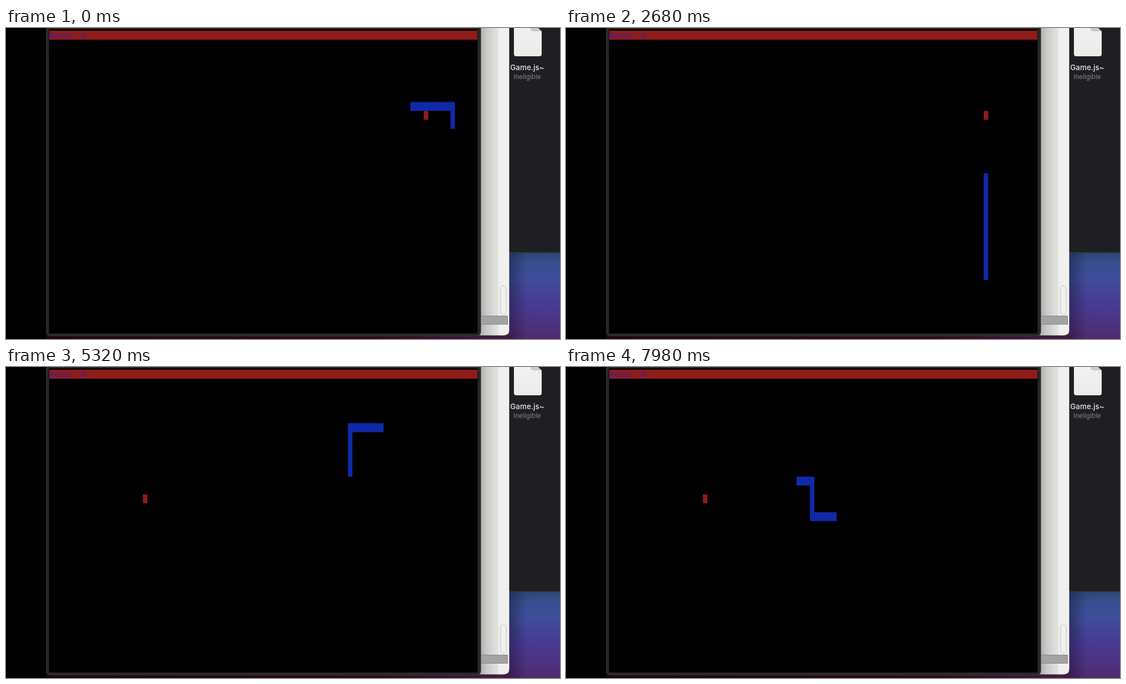
An HTML page for the animation above (8000 ms loop, 998 by 561 pixels).

```html
<!DOCTYPE html>
<html lang="en">
<head>
<meta charset="utf-8">
<title>Terminal snake</title>
<style>
  html, body { margin: 0; width: 100%; height: 100%; overflow: hidden; background: #000; }
  svg { display: block; width: 100%; height: 100%; }
  .label { font-family: Inter, sans-serif; text-anchor: middle; }
  #score { font: bold 13.35px "Liberation Mono", monospace; fill: #40209c; white-space: pre; }
</style>
</head>
<body>
<svg viewBox="0 0 998 561">
  <defs>
    <linearGradient id="wallpaper" x2="0" y2="1">
      <stop stop-color="#2c4773"/>
      <stop offset=".12" stop-color="#374f8f"/>
      <stop offset=".3" stop-color="#3f4d9c"/>
      <stop offset=".6" stop-color="#483a92"/>
      <stop offset=".85" stop-color="#4d317f"/>
      <stop offset="1" stop-color="#512a6c"/>
    </linearGradient>
    <linearGradient id="shade">
      <stop stop-color="#000" stop-opacity=".3"/>
      <stop offset="1" stop-color="#000" stop-opacity="0"/>
    </linearGradient>
    <linearGradient id="floor">
      <stop stop-color="#1c0508"/>
      <stop offset=".7" stop-color="#2b0a18"/>
      <stop offset="1" stop-color="#451c42"/>
    </linearGradient>
    <linearGradient id="paper" gradientUnits="userSpaceOnUse" x1="855" x2="907">
      <stop stop-color="#b2b2b0"/>
      <stop offset=".25" stop-color="#cdcdcb"/>
      <stop offset=".6" stop-color="#e2e2e0"/>
      <stop offset=".63" stop-color="#eeeeec"/>
      <stop offset="1" stop-color="#f1f1ef"/>
    </linearGradient>
    <linearGradient id="sheet" x2="0" y2="1">
      <stop stop-color="#f1f1ef"/>
      <stop offset="1" stop-color="#ebebe9"/>
    </linearGradient>
  </defs>

  <!-- Desktop -->
  <rect width="998" height="561"/>
  <rect x="900" width="98" height="405" fill="#1f1e23"/>
  <rect x="900" y="405" width="98" height="156" fill="url(#wallpaper)"/>
  <rect x="907" y="405" width="32" height="156" fill="url(#shade)"/>
  <rect x="907" y="404.5" width="91" height="1.2" fill="#263c50"/>
  <rect x="72" y="553" width="840" height="8" fill="url(#floor)"/>
  <path d="M915 0H945L965 6V47Q965 51 961 51H919Q915 51 915 47Z" fill="url(#sheet)"/>
  <path d="M944 0Q946 6 951 6H965L959 0Z" fill="#c9c9c7"/>
  <text class="label" x="939" y="76" font-size="13.5" font-weight="500" fill="#e4e4e6">Game.js~</text>
  <text class="label" x="939" y="92" font-size="11.7" fill="#838387">Ineligible</text>

  <!-- Window behind -->
  <path d="M846 0H906.5V544Q906.5 554.5 896 554.5H846Z" fill="url(#paper)"/>
  <rect x="848" y="519.5" width="55.5" height="15" fill="#a3a3a1" stroke="#868684"/>
  <rect x="891" y="465" width="10" height="52" rx="5" fill="#f1f1ef" stroke="#c0c0be"/>

  <!-- Terminal -->
  <path d="M72.5 0H855.5V548Q855.5 556 847 556H81Q72.5 556 72.5 548Z" fill="#262628"/>
  <path d="M73 0V548Q73 555.5 81 555.5H847Q855 555.5 855 548V0" fill="none" stroke="#3c3c3e"/>
  <rect x="77.5" y="2.5" width="772" height="548.5"/>
  <rect x="78" y="4.8" width="771" height="16.3" fill="#8f1c19"/>
  <text id="score" x="78.4" y="17.5"></text>
  <path id="food" fill="#8f1c19"/>
  <path id="snake" fill="#1029a8"/>
</svg>

<script>
const LOOP = 8000;
const CELL_W = 8.03, CELL_H = 16.06, LEFT = 78, TOP = 5;
const START_LENGTH = 12, MEAL_STEP = 41;

// Corners of the snake's route, in terminal columns and rows
const corners = [[81, 8], [90, 8], [90, 27], [84, 27], [84, 6], [67, 6], [67, 16], [45, 16], [45, 12], [42, 12]];
// Pace of the game: [tick, steps taken]
const pace = [[0, 0], [30, 18], [58, 34], [91, 54], [114, 66], [149, 88], [171, 100]];

const route = [corners[0]];
for (const [col, row] of corners.slice(1)) {
  let [c, r] = route.at(-1);
  while (c !== col || r !== row) {
    c += Math.sign(col - c);
    r += Math.sign(row - r);
    route.push([c, r]);
  }
}

// Screen refreshes last 20, 20 and 100 ms in turn
const refreshes = t => 3 * Math.floor(t / 140) + Math.min(2, Math.floor(t % 140 / 20));
const tickAt = t => t < 4920 ? refreshes(t + 20) - 1 : refreshes(t);

function stepsAt(tick) {
  const i = Math.max(1, pace.findIndex(([end]) => tick <= end));
  const [[t0, s0], [t1, s1]] = [pace[i - 1], pace[i]];
  return Math.floor(s0 + (s1 - s0) * (tick - t0) / (t1 - t0) + 0.5);
}

function cellPath([col, row]) {
  const x = LEFT + col * CELL_W, y = TOP + row * CELL_H;
  return `M${x} ${y}H${x + CELL_W}V${y + CELL_H}H${x}Z`;
}

const [score, food, snake] = ["score", "food", "snake"].map(id => document.getElementById(id));

function draw(t) {
  const steps = stepsAt(tickAt(t));
  const eaten = steps >= MEAL_STEP;
  const end = START_LENGTH + steps;
  const length = START_LENGTH + (eaten ? 1 : 0);
  snake.setAttribute("d", route.slice(end - length, end).map(cellPath).join(""));
  food.setAttribute("d", cellPath(eaten ? [21, 14] : [84, 9]));
  score.textContent = `Score: ${eaten ? 4 : 3}`;
}

const start = performance.now();
function loop() {
  draw((performance.now() - start) % LOOP);
  requestAnimationFrame(loop);
}
loop();
</script>
</body>
</html>
```
